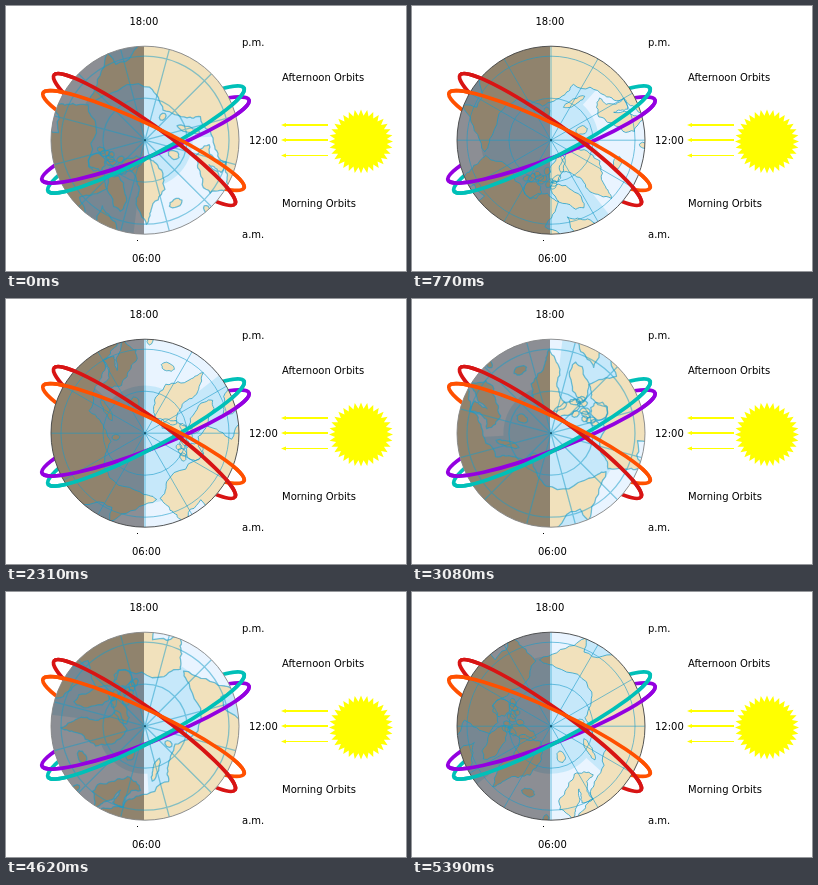
These frames come from a looping animation (400x265 px, 6160 ms). An HTML page with a canvas:

```html
<!DOCTYPE html>
<html lang="en">
<head>
<meta charset="utf-8">
<title>Morning and afternoon orbits</title>
<style>
html, body { margin: 0; width: 100%; height: 100%; overflow: hidden; background: #fff; }
canvas { display: block; }
</style>
</head>
<body>
<canvas id="stage" width="400" height="265"></canvas>
<script>
const ctx = document.getElementById('stage').getContext('2d');
const STEP_MS = 770, STEPS = 8, TAU = Math.PI * 2, RAD = Math.PI / 180;
const CX = 139, CY = 134.2, RADIUS = 94, PX_PER_DEGREE = 2.8;

const polarRadius = lat => (90 - lat) * PX_PER_DEGREE;
const project = ([lon, lat]) => [
  polarRadius(lat) * Math.cos(lon * RAD),
  -polarRadius(lat) * Math.sin(lon * RAD)
];

let seed = 7;
function random() {
  const v = Math.sin(seed++ * 127.1) * 43758.5453;
  return v - Math.floor(v);
}

// Repeated midpoint displacement turns a coarse outline into a ragged coast.
function coast(points, passes = 3) {
  for (let pass = 0; pass < passes; pass++) {
    points = points.flatMap(([x, y], i) => {
      const [nextX, nextY] = points[(i + 1) % points.length];
      const dx = nextX - x, dy = nextY - y;
      const shift = Math.hypot(dx, dy) < 3 ? 0 : (random() - 0.5) * 0.36;
      return [[x, y], [x + dx / 2 - dy * shift, y + dy / 2 + dx * shift]];
    });
  }
  const path = new Path2D();
  points.forEach(point => path.lineTo(...point));
  path.closePath();
  return path;
}

// Closes a mainland coast, beyond the visible rim, back to its first point.
function mainland(points) {
  const first = points[0][0], last = points[points.length - 1][0];
  const rim = [];
  for (let i = 0; i <= 8; i++) rim.push([last + (first - last) * i / 8, 44]);
  return coast([...points, ...rim].map(project));
}

// An elongated island; tilt is measured from its meridian.
function island(lon, lat, length, width, tilt = 0) {
  const [x, y] = project([lon, lat]);
  const axis = tilt - lon * RAD;
  const points = [];
  for (let i = 0; i < 8; i++) {
    const u = length * Math.cos(i * TAU / 8), v = width * Math.sin(i * TAU / 8);
    points.push([
      x + u * Math.cos(axis) - v * Math.sin(axis),
      y + u * Math.sin(axis) + v * Math.cos(axis)
    ]);
  }
  return coast(points, 2);
}

const eurasia = mainland([[3, 51], [14, 54], [22, 58], [30, 60], [40, 65], [68, 68.5],
  [73, 73], [104, 77.5], [130, 71], [175, 69], [190, 66], [164, 60], [157, 52],
  [156, 61], [136, 54]]);
const america = mainland([[-140, 59], [-157, 56], [-162, 61], [-167, 66], [-156, 71],
  [-110, 68], [-94, 71], [-83, 68], [-94, 59], [-80, 52], [-78, 62], [-65, 59],
  [-56, 52]]);
const scandinavia = coast([[13, 56], [6, 60], [14, 67], [26, 71], [41, 67], [33, 66.5],
  [30, 60], [22, 60.5], [24, 65.5], [18, 60]].map(project));
const greenland = coast([[-73, 78], [-60, 82], [-35, 83.5], [-18, 80], [-23, 71],
  [-40, 65], [-44, 60], [-53, 67], [-56, 75]].map(project));

const lands = [
  eurasia, america, scandinavia, greenland,
  island(-74, 69, 20, 8, -0.7),
  island(-78, 79.5, 15, 7, 0.55),
  island(-110, 71, 9, 9),
  island(59, 74, 12, 3, 0.55),
  island(18, 78.5, 6, 4),
  island(98, 79.5, 4, 3),
  island(-19, 65, 4, 7),
  island(-3, 54.5, 11, 4)
];
for (let lon = -122; lon < -80; lon += 5) {
  lands.push(island(lon, 73 + random() * 6, 3 + random() * 3, 3, random()));
}

// Ice-free water lies outside a given latitude between two meridians.
function openSea(west, east, lat) {
  const path = new Path2D();
  path.arc(0, 0, polarRadius(lat), -west * RAD, -east * RAD, true);
  path.arc(0, 0, RADIUS + 5, -east * RAD, -west * RAD);
  return path;
}
const seas = [openSea(-52, 48, 73), openSea(160, 235, 65)];

const graticule = new Path2D();
for (let angle = 0; angle < TAU; angle += TAU / 12) {
  graticule.moveTo(0, 0);
  graticule.lineTo(RADIUS * Math.cos(angle), RADIUS * Math.sin(angle));
}
for (const lat of [75, 60]) {
  graticule.moveTo(polarRadius(lat), 0);
  graticule.arc(0, 0, polarRadius(lat), 0, TAU);
}

// Each orbit is an ellipse between two tips; its near half bulges up or down.
const orbits = [
  { color: '#9400e0', tips: [36, 174, 243, 94], near: 'down' },
  { color: '#00c0b8', tips: [42, 185, 238, 82], near: 'down' },
  { color: '#d81414', tips: [48, 69, 229, 198], near: 'up' },
  { color: '#ff5000', tips: [37, 87, 238, 182], near: 'up' }
];

function drawOrbit({ color, tips: [x1, y1, x2, y2], near }, nearOnly) {
  const start = nearOnly && near === 'up' ? Math.PI : 0;
  ctx.beginPath();
  ctx.ellipse((x1 + x2) / 2, (y1 + y2) / 2, Math.hypot(x2 - x1, y2 - y1) / 2, 17,
    Math.atan2(y2 - y1, x2 - x1), start, start + (nearOnly ? Math.PI : TAU));
  ctx.strokeStyle = color;
  ctx.lineWidth = 3.8;
  ctx.stroke();
}

function drawGlobe(step) {
  const soft = step % 2 === 0;
  const turn = (1 - step) * TAU / STEPS;
  ctx.save();
  ctx.translate(CX, CY);
  ctx.beginPath();
  ctx.arc(0, 0, RADIUS, 0, TAU);
  ctx.save();
  ctx.clip();

  ctx.rotate(turn);
  ctx.fillStyle = '#c6e8fa';
  ctx.fillRect(-RADIUS, -RADIUS, RADIUS * 2, RADIUS * 2);
  ctx.fillStyle = '#e9f4ff';
  seas.forEach(sea => ctx.fill(sea));
  ctx.fillStyle = '#f1e1bc';
  lands.forEach(land => ctx.fill(land));

  // The night side keeps still while the map turns.
  ctx.rotate(-turn);
  ctx.fillStyle = 'rgba(10,0,0,0.42)';
  ctx.fillRect(-RADIUS, -RADIUS, RADIUS - 1, RADIUS * 2);

  ctx.rotate(turn);
  ctx.strokeStyle = '#199bc8';
  ctx.lineJoin = 'round';
  ctx.globalAlpha = soft ? 0.6 : 0.8;
  ctx.lineWidth = soft ? 1.3 : 0.9;
  lands.forEach(land => ctx.stroke(land));
  ctx.globalAlpha = soft ? 0.5 : 0.65;
  ctx.stroke(graticule);
  ctx.restore();

  ctx.beginPath();
  ctx.arc(0, 0, RADIUS, 0, TAU);
  ctx.strokeStyle = soft ? '#858585' : '#444';
  ctx.lineWidth = 0.9;
  ctx.stroke();
  ctx.fillStyle = '#175d76';
  ctx.fillRect(-1, -1, 2, 2);
  ctx.restore();
}

function drawSun() {
  const spikes = 32;
  ctx.fillStyle = '#ff0';
  ctx.beginPath();
  for (let i = 0; i < spikes * 2; i++) {
    const r = i % 2 ? 26 : 32;
    const a = i * Math.PI / spikes;
    ctx.lineTo(355 + r * Math.cos(a), 135.5 + r * Math.sin(a));
  }
  ctx.fill();
  [[119, 2], [134, 2], [149.5, 1]].forEach(([y, width]) => {
    ctx.fillRect(278, y - width / 2, 44, width);
    ctx.beginPath();
    ctx.moveTo(275, y);
    ctx.lineTo(280, y - 2);
    ctx.lineTo(280, y + 2);
    ctx.fill();
  });
}

function drawLabels() {
  ctx.fillStyle = '#000';
  ctx.font = '10px "DejaVu Sans", sans-serif';
  ctx.fillText('18:00', 123.5, 19);
  ctx.fillText('06:00', 126, 256);
  ctx.fillText('12:00', 243, 138);
  ctx.fillText('p.m.', 236, 40);
  ctx.fillText('a.m.', 236, 232);
  ctx.fillText('Afternoon Orbits', 276, 75);
  ctx.fillText('Morning Orbits', 276, 201);
  ctx.fillRect(131, 234, 1, 1);
}

function draw(now) {
  const step = Math.floor(now / STEP_MS) % STEPS;
  ctx.fillStyle = '#fff';
  ctx.fillRect(0, 0, 400, 265);
  orbits.forEach(orbit => drawOrbit(orbit, false));
  drawGlobe(step);
  orbits.forEach(orbit => drawOrbit(orbit, true));
  drawSun();
  drawLabels();
}

const startTime = performance.now();
function tick() {
  draw(performance.now() - startTime);
  requestAnimationFrame(tick);
}
tick();
</script>
</body>
</html>
```
